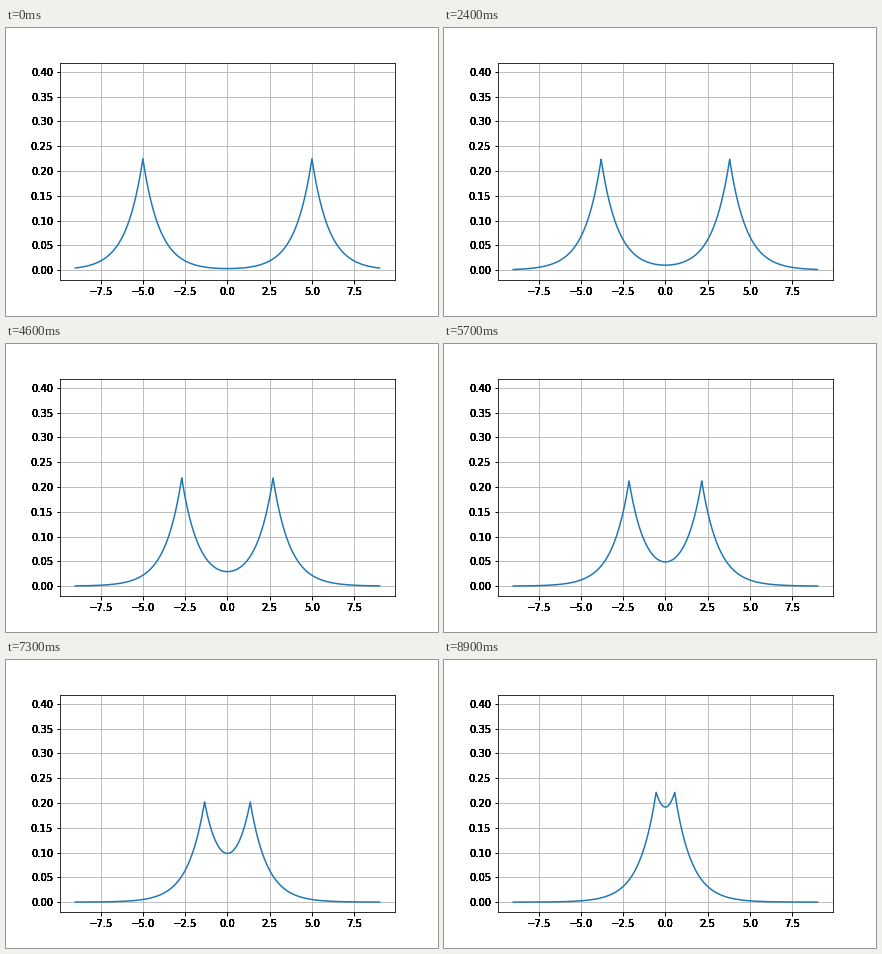
Recreate the animation shown at these times as a matplotlib script. Size 432 by 288 pixels, loop 9000 ms.

```python
import numpy as np
import matplotlib.pyplot as plt
from matplotlib.animation import FuncAnimation

FRAMES, INTERVAL = 90, 100
LABEL_PASSES = 8  # overprinting gives the labels their heavy edges

plt.rcParams["font.family"] = "DejaVu Sans"
plt.rcParams["font.size"] = 10

x = np.linspace(-9, 9, 1801)


def bonding_orbital(r):
    """Sum of two 1s orbitals centred at -r and r, with overlap."""
    d = 2 * r
    overlap = np.exp(-d) * (1 + d + d**2 / 3)
    waves = np.exp(-abs(x - r)) + np.exp(-abs(x + r))
    return waves / (np.pi * np.sqrt(2 * (1 + overlap)))


fig = plt.figure(figsize=(6, 4), dpi=72, facecolor="white")
ax = fig.add_axes([0.125, 0.125, 0.775, 0.755])
ax.set_xlim(-9.9, 9.9)
peak = 1 / np.sqrt(2 * np.pi)
ax.set_ylim(-0.05 * peak, 1.05 * peak)

xticks = np.arange(-7.5, 7.6, 2.5)
yticks = np.arange(9) * 0.05
ax.set_xticks(xticks)
ax.set_yticks(yticks)
ax.tick_params(width=1, labelbottom=False, labelleft=False)
ax.grid(True)


def label(text, xy, coords, offset, ha, va):
    for _ in range(LABEL_PASSES):
        ax.annotate(text, xy, xycoords=coords, xytext=offset,
                    textcoords="offset points", ha=ha, va=va,
                    annotation_clip=False)


for v in xticks:
    label(f"{v:.1f}".replace("-", "\u2212"), (v, 0),
          ax.get_xaxis_transform(), (0, -7), "center", "top")
for v in yticks:
    label(f"{v:.2f}", (0, v),
          ax.get_yaxis_transform(), (-7, 0), "right", "center_baseline")

line, = ax.plot(x, bonding_orbital(5), color="C0", lw=1.5)


def update(i):
    line.set_ydata(bonding_orbital(5 - 0.05 * i))
    return line,


anim = FuncAnimation(fig, update, frames=FRAMES, interval=INTERVAL,
                     repeat=True, repeat_delay=0)
plt.show()
```
